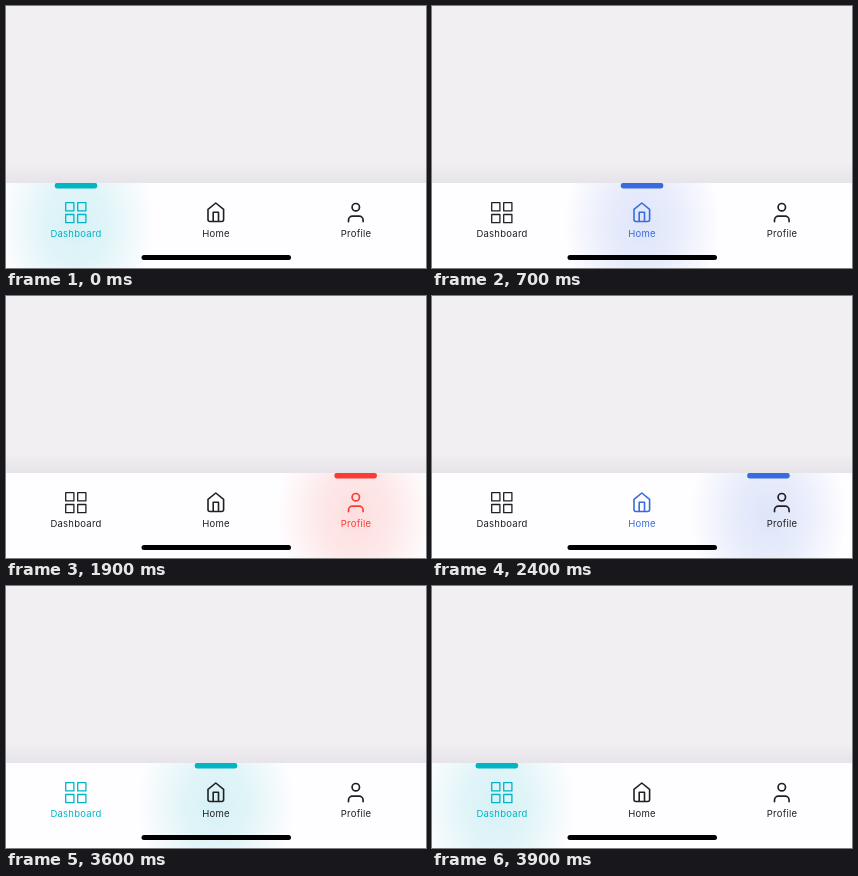
Animation, 420 px wide and 262 px high, one loop 4000 ms. Source, as an HTML page:

```html
<!DOCTYPE html>
<html lang="en">
<head>
<meta charset="utf-8">
<title>Tab bar</title>
<style>
  html, body { margin: 0; width: 100%; height: 100%; overflow: hidden; background: #f1eff2; }
  svg { display: block; width: 420px; height: 262px; }
  text { font: 9.5px Inter, sans-serif; letter-spacing: .25px; text-anchor: middle; fill: currentColor; }
  .icon { fill: none; stroke: currentColor; stroke-linecap: round; stroke-linejoin: round; }
</style>
</head>
<body>
<svg viewBox="0 0 420 262">
  <defs>
    <linearGradient id="shade" x2="0" y2="1">
      <stop offset="0" stop-color="#e6e4e8" stop-opacity="0"/>
      <stop offset="1" stop-color="#e6e4e8"/>
    </linearGradient>
    <radialGradient id="glow">
      <stop offset="0" stop-color="currentColor" stop-opacity=".16"/>
      <stop offset=".45" stop-color="currentColor" stop-opacity=".11"/>
      <stop offset="1" stop-color="currentColor" stop-opacity="0"/>
    </radialGradient>
    <clipPath id="nav"><path d="M0 177h420v85H0z"/></clipPath>
  </defs>
  <path fill="#f1eff2" d="M0 0h420v262H0z"/>
  <path fill="url(#shade)" d="M0 157h420v20H0z"/>
  <path fill="#fefdff" d="M0 177h420v85H0z"/>
  <g clip-path="url(#nav)">
    <g id="marker">
      <radialGradient id="markerGlow" href="#glow">
        <stop offset="0" stop-color="currentColor" stop-opacity=".16"/>
        <stop offset=".45" stop-color="currentColor" stop-opacity=".11"/>
        <stop offset="1" stop-color="currentColor" stop-opacity="0"/>
      </radialGradient>
      <ellipse cy="219" rx="78" ry="100" fill="url(#markerGlow)"/>
      <rect x="-21.3" y="177" width="42.6" height="5.4" rx="2.3" fill="currentColor"/>
    </g>
  </g>
  <g class="tab">
    <path class="icon" stroke-width="1.3" d="M59.7 196.7h8.2v8.2h-8.2zM71.7 196.7h8.2v8.2h-8.2zM59.7 208.5h8.2v8.2h-8.2zM71.7 208.5h8.2v8.2h-8.2z"/>
    <text x="70" y="231">Dashboard</text>
  </g>
  <g class="tab">
    <path class="icon" stroke-width="1.6" d="M202 203.3l7.8-6.3 7.8 6.3v10.2a2 2 0 0 1-2 2h-11.600a2 2 0 0 1-2-2zM207.200 215.500v-9.200h5.300v9.200"/>
    <text x="210" y="231">Home</text>
  </g>
  <g class="tab">
    <g class="icon" stroke-width="1.7">
      <circle cx="349.800" cy="201.200" r="3.700"/>
      <path d="M342.500 215.600v-1.400a4 4 0 0 1 4-4h6.600a4 4 0 0 1 4 4v1.400"/>
    </g>
    <text x="350" y="231">Profile</text>
  </g>
  <rect x="135.500" y="249" width="149.500" height="5" rx="2.500"/>
</svg>
<script>
const LOOP = 4000, STEP = 100, FADE = 80;
const INK = [32, 32, 36];
const COLORS = [[0, 181, 196], [56, 106, 224], [250, 60, 52]];
const centers = [70, 210, 350];
// Each tap recolours first; the marker springs shortly after.
const taps = [
  { from: 0, to: 1, tint: 60, move: 200 },
  { from: 1, to: 2, tint: 1170, move: 1317 },
  { from: 2, to: 1, tint: 2310, move: 2367 },
  { from: 1, to: 0, tint: 3370, move: 3653 },
];
const marker = document.getElementById('marker');
const tabs = document.querySelectorAll('.tab');

const clamp = v => Math.min(1, Math.max(0, v));
const mix = (a, b, k) => a.map((v, i) => v + (b[i] - v) * k);
const css = c => `rgb(${c.map(Math.round)})`;

function spring(ms) {
  if (ms <= 0) return 0;
  const t = ms / 1000, omega = 15, zeta = 0.69;
  const damped = omega * Math.sqrt(1 - zeta * zeta), decay = zeta * omega;
  return 1 - Math.exp(-decay * t) *
    (Math.cos(damped * t) + decay / damped * Math.sin(damped * t));
}

function draw(t) {
  let x = centers[0], color = COLORS[0];
  const active = [1, 0, 0];
  for (const { from, to, tint, move } of taps) {
    const k = clamp((t - tint) / FADE);
    x += (centers[to] - centers[from]) * spring(t - move);
    color = mix(color, COLORS[to], k);
    active[from] -= k;
    active[to] += k;
  }
  marker.setAttribute('transform', `translate(${x.toFixed(2)} 0)`);
  marker.style.color = css(color);
  tabs.forEach((tab, i) => tab.style.color = css(mix(INK, COLORS[i], active[i])));
}

function tick() {
  const t = performance.now() % LOOP;
  draw(Math.floor(t / STEP) * STEP);
  requestAnimationFrame(tick);
}
tick();
</script>
</body>
</html>
```
